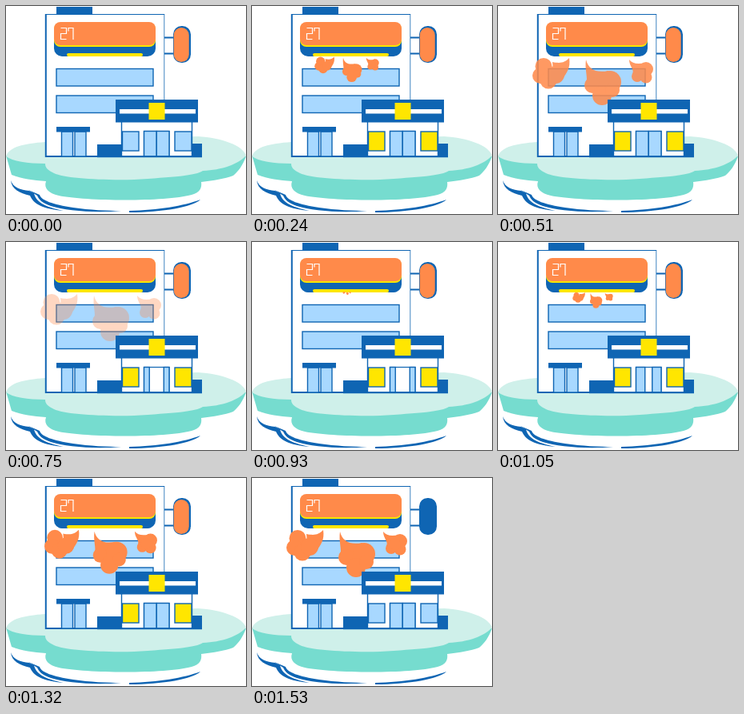
An HTML page for the animation above (1800 ms loop, 300 px wide and 260 px high).

```html
<!DOCTYPE html>
<html lang="en">
<head>
<meta charset="utf-8">
<title>Shop on an island</title>
<style>
  html, body { margin: 0; width: 100%; height: 100%; overflow: hidden; background: #fff; }
  svg { display: block; width: 100%; height: 100%; }
  .blue { fill: #0f65b3; }
  .glass { fill: #a8d8ff; }
  .orange { fill: #ff8a4a; }
  .yellow { fill: #ffe600; }
  .white { fill: #fff; }
  .line { fill: none; stroke: #0f65b3; stroke-width: 1.2; }
  .edge { stroke: #0f65b3; stroke-width: 1.4; }
  .bold { stroke-width: 2; }
  .thin { stroke-width: .8; }
</style>
</head>
<body>
<svg viewBox="0 0 300 260">
  <!-- island and waves -->
  <path fill="#76dccf" d="M0 187L7 211C20 216 34 218 50 219C47 228 53 234 66 237C100 244 198 245 232 236C243 233 245 227 244 220C260 218 273 216 284 212C291 206 296 199 300 188Z"/>
  <path fill="#cff0ea" d="M0 188C4 176 22 172 49 170L240 163C270 165 296 174 300 187C290 198 270 205 246 206C238 212 208 214 160 217C116 218 72 215 60 209C52 205 49 202 49 197C27 197 8 194 0 188Z"/>
  <path class="blue" d="M6 218C9 227 18 230 29 231L35 234C37 244 47 251 72 256C46 254 34 247 30 237C17 234 7 229 6 218Z"/>
  <path class="blue" d="M28 230L42 236C44 243 58 248 84 252C105 255 126 256 144 256C112 259 75 256 56 250C45 246 41 242 39 237Z"/>
  <path class="blue" d="M154 256C190 255 222 250 243 242C234 251 196 258 154 258Z"/>

  <!-- tower -->
  <rect class="blue" x="63" y="1" width="45" height="10"/>
  <rect class="white" x="49" y="10" width="148.500" height="178"/>
  <path class="line" d="M49 10.500H198"/>
  <path class="line thin" d="M197.800 10V118"/>
  <path class="line bold" d="M49.800 10V188H245"/>
  <rect class="blue" x="60" y="22" width="127" height="41" rx="10"/>
  <rect class="yellow" x="60" y="21" width="127" height="30" rx="8"/>
  <rect class="orange" x="60" y="20" width="127" height="29" rx="8"/>
  <rect class="yellow" x="76" y="59" width="95" height="4" rx="2"/>
  <g role="img" aria-label="27" fill="none" stroke="#fff" stroke-width="1.2">
    <path d="M68.500 27.500H75.500V34.500H68.500V41.500H75.500M78 31.500V27.500H84V42"/>
  </g>
  <g class="glass edge">
    <rect x="63" y="78.500" width="121" height="21.500"/>
    <rect x="63" y="112" width="121" height="21.500"/>
    <rect x="69.500" y="157" width="14" height="31"/>
    <rect x="86" y="157" width="14" height="31"/>
  </g>
  <rect class="blue" x="63" y="151" width="42" height="6.500"/>

  <!-- hanging sign -->
  <path class="line bold" d="M198 39.500H211M198 59.500H211"/>
  <rect class="blue" x="209" y="25" width="22" height="46" rx="10.500"/>
  <rect class="orange" id="sign" x="209.700" y="27" width="19" height="43" rx="9.500"/>

  <g id="smoke" class="orange">
    <path d="M89 65C83 71 78 72 68 70L70 92L80 92C86 84 91 77 89 65Z"/>
    <circle cx="57" cy="75.500" r="10.500"/><circle cx="53" cy="87" r="10"/>
    <circle cx="63" cy="93" r="10.500"/><circle cx="72" cy="86" r="11"/>
    <path d="M110 67C113 79 122 84 138 81L136 104L110 99C113 89 108 80 110 67Z"/>
    <circle cx="118" cy="99" r="10"/><circle cx="140" cy="95" r="14"/>
    <circle cx="130" cy="112" r="12"/><circle cx="143" cy="105" r="9"/>
    <path d="M164 67C168 72 174 73 184 71L184 88L168 85C171 79 164 76 164 67Z"/>
    <circle cx="174" cy="88" r="7"/><circle cx="185" cy="79" r="9"/>
    <circle cx="185" cy="89" r="7.500"/><circle cx="179" cy="83" r="7"/>
  </g>

  <!-- shop -->
  <rect class="blue" x="114" y="173" width="31" height="16"/>
  <rect class="blue" x="231" y="172" width="14" height="17"/>
  <rect class="white edge" x="144.500" y="144" width="88" height="44"/>
  <rect class="blue" x="137" y="117" width="103" height="28.500"/>
  <rect class="white" x="142" y="129" width="95" height="5.500"/>
  <rect class="yellow" x="178.500" y="121" width="20" height="21"/>
  <g id="panes" class="edge">
    <rect x="145.500" y="157" width="20.500" height="24"/>
    <rect x="211" y="157" width="21" height="24"/>
  </g>
  <rect class="line" x="172.500" y="156.500" width="31.500" height="31.500"/>
  <g class="glass edge">
    <rect id="leftDoor" x="172.500" y="156.500" height="31.500"/>
    <rect id="rightDoor" y="156.500" height="31.500"/>
  </g>
  <path class="line bold" d="M114 188.200H245"/>
</svg>
<script>
  const LOOP = 1800, STEP = 30, GROW = 450, LIGHTS_OFF = 1530;
  const [sign, smoke, panes, leftDoor, rightDoor] =
    ["sign", "smoke", "panes", "leftDoor", "rightDoor"].map(id => document.getElementById(id));
  const ramp = (t, from, to) => Math.min(1, Math.max(0, (t - from) / (to - from)));

  function draw(t) {
    // First puff grows and fades; the second grows and stays until the loop ends.
    const second = t >= 2 * GROW;
    const size = ramp(second ? t - 2 * GROW : t, 0, GROW);
    smoke.setAttribute("transform", `translate(118.5 62) scale(${size}) translate(-118.5 -62)`);
    smoke.setAttribute("opacity", second ? 1 : 1 - ramp(t, GROW, 2 * GROW));

    sign.setAttribute("visibility", t < LIGHTS_OFF ? "visible" : "hidden");
    panes.setAttribute("fill", t >= 90 && t < LIGHTS_OFF ? "#ffe600" : "#a8d8ff");

    const open = ramp(t, 540, 720) - ramp(t, 960, 1140);
    const width = 15.75 - 9 * open;
    leftDoor.setAttribute("width", width);
    rightDoor.setAttribute("width", width);
    rightDoor.setAttribute("x", 204 - width);
  }

  const start = performance.now();
  function tick() {
    const t = (performance.now() - start) % LOOP;
    draw(Math.floor(t / STEP) * STEP);
    requestAnimationFrame(tick);
  }
  tick();
</script>
</body>
</html>
```
